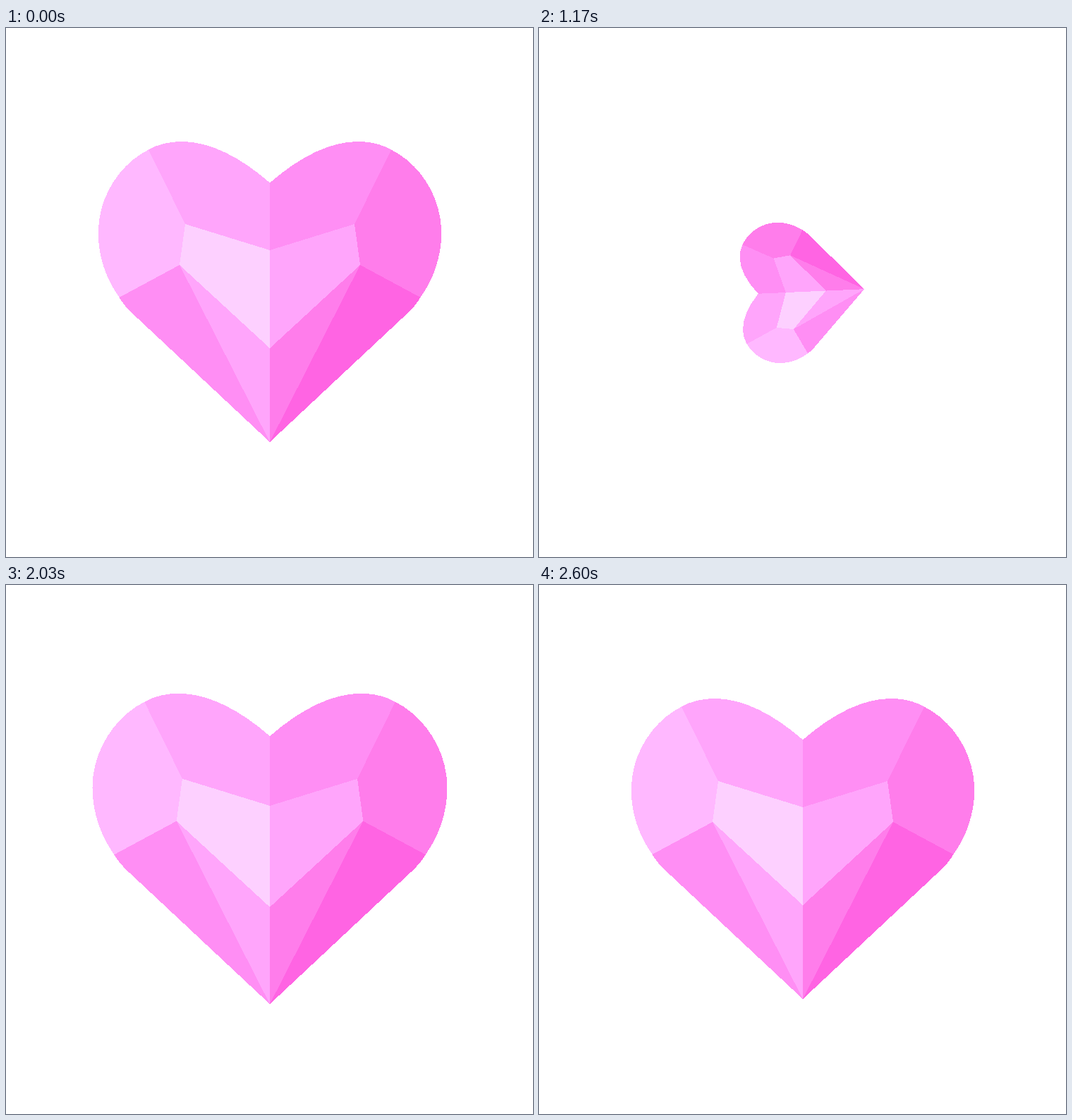
Animation, 747 px wide and 750 px high, one loop 3010 ms. Source, as an HTML page:

```html
<!DOCTYPE html>
<html lang="en">
<head>
<meta charset="utf-8">
<title>Gem heart</title>
<style>
  html, body { margin: 0; width: 100%; height: 100%; overflow: hidden; background: #fff; }
  svg { display: block; width: 100%; height: 100%; }
</style>
</head>
<body>
<svg viewBox="0 0 747 750" shape-rendering="crispEdges">
  <defs>
    <!-- left half of the stone, x and y measured on the stage -->
    <path id="lobe" d="M202 172.5C161 193 130.7 240 130.7 290C130.7 324 142 356 160.5 382L246 336L254 278Z"/>
    <path id="top" d="M374 219.5C330 181 287 161 249 161C232 161 216 164.5 202 172.5L254 278L374 315Z"/>
    <path id="table" d="M254 278L374 315V454L246 336Z"/>
    <path id="side" d="M160.5 382C166 391 172 398 179.5 405L374 587L246 336Z"/>
    <path id="keel" d="M246 336L374 454V587Z"/>
  </defs>
  <g id="heart">
    <g>
      <use href="#lobe" fill="#ffb8ff"/>
      <use href="#top" fill="#ffa5fb"/>
      <use href="#table" fill="#fdd0ff"/>
      <use href="#side" fill="#ff8ef4"/>
      <use href="#keel" fill="#ffa5fb"/>
    </g>
    <g transform="matrix(-1 0 0 1 748 0)">
      <use href="#lobe" fill="#ff7deb"/>
      <use href="#top" fill="#ff8ef4"/>
      <use href="#table" fill="#ffa5fb"/>
      <use href="#side" fill="#ff64e3"/>
      <use href="#keel" fill="#ff7deb"/>
    </g>
  </g>
</svg>
<script>
  const heart = document.getElementById('heart');
  const LOOP = 3010, FPS = 30, CENTER = 374;

  const bezier = (a, b, p) => 3 * (1 - p) ** 2 * p * a + 3 * (1 - p) * p * p * b + p ** 3;

  // Quick start, long soft landing: cubic-bezier(.15, 0, .317, 1)
  function ease(u) {
    let lo = 0, hi = 1;
    for (let i = 0; i < 24; i++) {
      const mid = (lo + hi) / 2;
      if (bezier(0.15, 0.317, mid) < u) lo = mid; else hi = mid;
    }
    return bezier(0, 1, lo);
  }

  // Eased value at frame n, going from a to b between two frames
  function tween(n, start, end, a, b) {
    const u = Math.min(1, Math.max(0, (n - start) / (end - start)));
    return u === 1 ? b : a + (b - a) * ease(u);
  }

  function pose(n) {
    if (n < 30) { // swell, then shrink away
      return [n < 7 ? tween(n, 0, 7, 1, 1.2) : tween(n, 7, 20, 1.2, 0), 0];
    }
    if (n < 60) { // spin in, swing past upright and settle
      n -= 30;
      const turn = n < 13 ? tween(n, 0, 13, -320, 40) : tween(n, 13, 20, 40, 0);
      return [tween(n, 0, 20, 0, 1), turn];
    }
    n = Math.min(n - 60, 18); // three beats
    return [1 + 0.135 * Math.sin(Math.PI * n / 6) ** 2, 0];
  }

  function draw(now) {
    const n = Math.floor((now % LOOP + 3.4) * FPS / 1000);
    const [scale, turn] = pose(n);
    heart.setAttribute('transform',
      `translate(${CENTER} ${CENTER}) rotate(${turn}) scale(${scale}) translate(${-CENTER} ${-CENTER})`);
  }

  let began;
  function tick(now) {
    began ??= now;
    draw(now - began);
    requestAnimationFrame(tick);
  }
  draw(0);
  requestAnimationFrame(tick);
</script>
</body>
</html>
```
